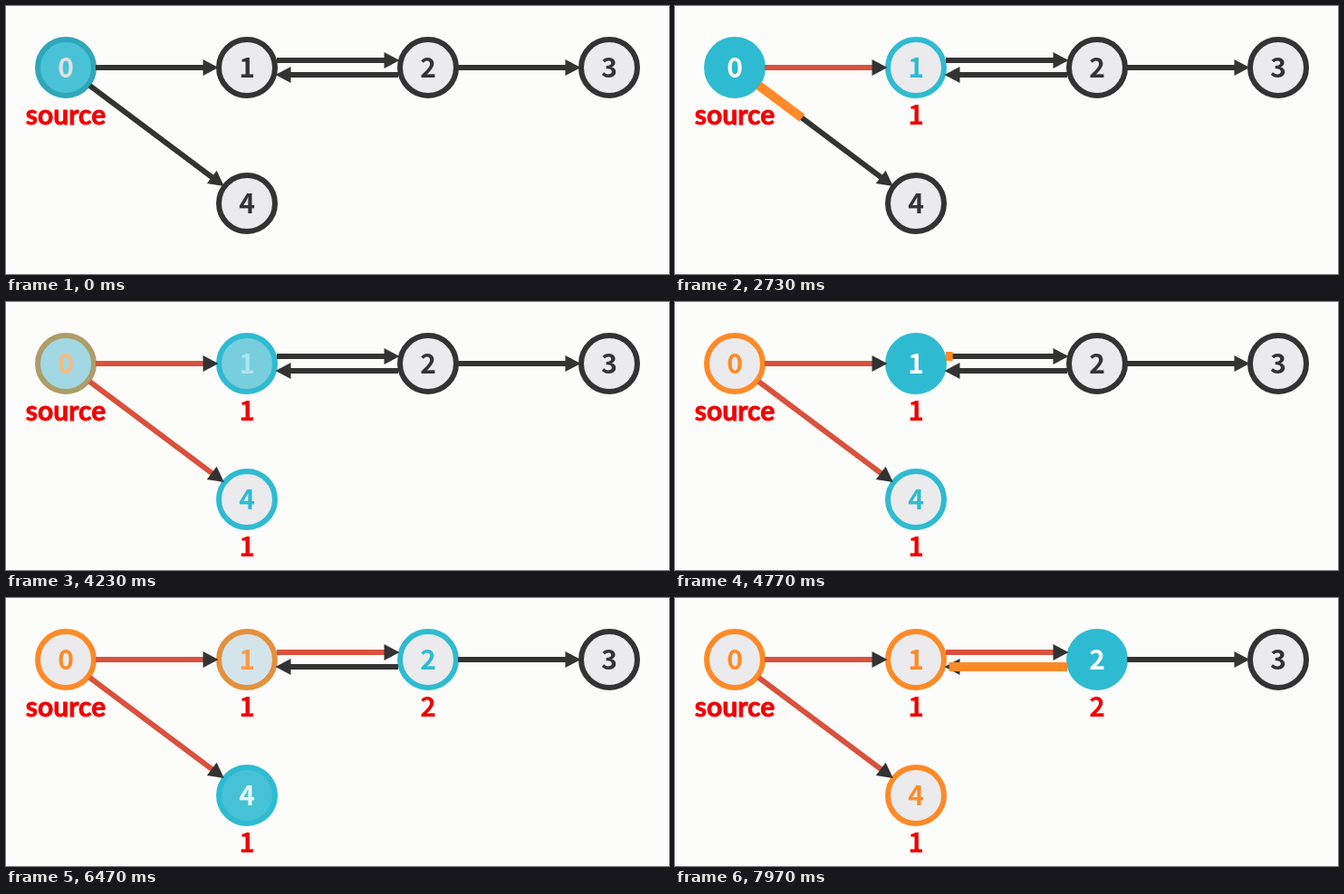
Write an HTML page that moves like this. It is 732 px wide and 296 px high and loops after 8000 ms.

```html
<!DOCTYPE html>
<html lang="en">
<head>
<meta charset="utf-8">
<title>Breadth-first search</title>
<style>
  html, body { margin: 0; width: 100%; height: 100%; overflow: hidden; background: #fcfcfb; }
  svg { display: block; width: 732px; height: 296px; }
  text { font: 700 30px "Noto Sans CJK JP", "Noto Sans CJK SC", Lato, sans-serif; text-anchor: middle; }
  .label { fill: #f00000; }
  .word { font-family: Lato, sans-serif; stroke: #f00000; stroke-width: 0.8px; }
</style>
</head>
<body>
<svg id="stage" viewBox="0 0 732 296"></svg>
<script>
const LOOP = 8000, FIRST = -400, STEP = 718, DURATION = 600;

const DARK = [51, 51, 51], PALE = [235, 235, 238], TEAL = [46, 187, 209];
const ORANGE = [255, 138, 39], RUST = [217, 81, 60], WHITE = [255, 255, 255];

// Node looks: fill, ring, digit
const LOOK = {
  rest: [PALE, DARK, DARK],
  queued: [PALE, TEAL, TEAL],
  active: [TEAL, TEAL, WHITE],
  done: [PALE, ORANGE, ORANGE]
};

// Changes are [step, look]; the label shows up halfway through labelStep
const nodes = [
  { x: 66, y: 68, label: 'source', labelStep: 0, changes: [[0, 'active'], [6, 'done']] },
  { x: 266, y: 68, label: '1', labelStep: 2, changes: [[3, 'queued'], [6, 'active'], [9, 'done']] },
  { x: 466, y: 68, label: '2', labelStep: 7, changes: [[8, 'queued'], [10, 'active']] },
  { x: 666, y: 68, changes: [] },
  { x: 266, y: 218, label: '1', labelStep: 4, changes: [[5, 'queued'], [9, 'active'], [10, 'done']] }
];

const edges = [
  { from: 0, to: 1, walk: 2 },
  { from: 0, to: 4, walk: 4 },
  { from: 1, to: 2, walk: 7, shift: -8 },
  { from: 2, to: 1, walk: 11, shift: -8 },
  { from: 2, to: 3 }
];

const stage = document.getElementById('stage');
const rgb = c => `rgb(${c.map(Math.round)})`;
const mix = (a, b, k) => a.map((v, i) => v + (b[i] - v) * k);
const easeInOut = p => p < 0.5 ? 4 * p ** 3 : 1 - 4 * (1 - p) ** 3;
const progress = (t, step) =>
  Math.min(1, Math.max(0, (t - FIRST - step * STEP) / DURATION));
const eased = (t, step) => easeInOut(progress(t, step));

function add(tag, attrs, parent = stage, text = '') {
  const el = document.createElementNS(stage.namespaceURI, tag);
  for (const name in attrs) el.setAttribute(name, attrs[name]);
  el.textContent = text;
  return parent.appendChild(el);
}

nodes.forEach((n, i) => {
  n.circle = add('circle', { cx: n.x, cy: n.y, r: 31, 'stroke-width': 6 });
  n.digit = add('text', { x: n.x, y: n.y + 11 }, stage, i);
  if (n.label) {
    const style = n.label.length > 1 ? 'label word' : 'label';
    n.labelText = add('text', { x: n.x, y: n.y + 63, class: style }, stage, n.label);
  }
});

// Each edge is drawn along its own x axis
edges.forEach(e => {
  const a = nodes[e.from], b = nodes[e.to];
  const dx = b.x - a.x, dy = b.y - a.y;
  const tip = Math.hypot(dx, dy) - 31.5;
  const angle = Math.atan2(dy, dx) * 180 / Math.PI;
  const group = add('g', {
    transform: `translate(${a.x} ${a.y}) rotate(${angle}) translate(0 ${e.shift || 0})`
  });
  e.start = 33;
  e.length = tip - e.start;
  e.line = add('path', { d: `M${e.start} 0H${tip - 10}`, 'stroke-width': 6 }, group);
  add('path', { d: `M${tip} 0l-17-9v18z`, fill: rgb(DARK) }, group);
  e.runner = add('path', { stroke: rgb(ORANGE), 'stroke-width': 10 }, group);
});

function drawNode(n, t) {
  let look = LOOK.rest;
  for (const [step, name] of n.changes) {
    const k = eased(t, step);
    look = look.map((c, i) => mix(c, LOOK[name][i], k));
  }
  n.circle.setAttribute('fill', rgb(look[0]));
  n.circle.setAttribute('stroke', rgb(look[1]));
  n.digit.setAttribute('fill', rgb(look[2]));
  if (n.labelText) n.labelText.setAttribute('opacity', Math.round(progress(t, n.labelStep)));
}

function drawEdge(e, t) {
  let color = DARK, run = 0;
  if (e.walk) {
    const p = progress(t, e.walk);
    if (p < 1) run = easeInOut(p) * e.length;
    else color = mix(ORANGE, RUST, eased(t, e.walk + 1));
  }
  e.line.setAttribute('stroke', rgb(color));
  e.runner.setAttribute('d', `M${e.start} 0h${run}`);
}

function draw(t) {
  nodes.forEach(n => drawNode(n, t));
  edges.forEach(e => drawEdge(e, t));
}

const begin = performance.now();
function tick() {
  draw((performance.now() - begin) % LOOP);
  requestAnimationFrame(tick);
}
tick();
</script>
</body>
</html>
```
